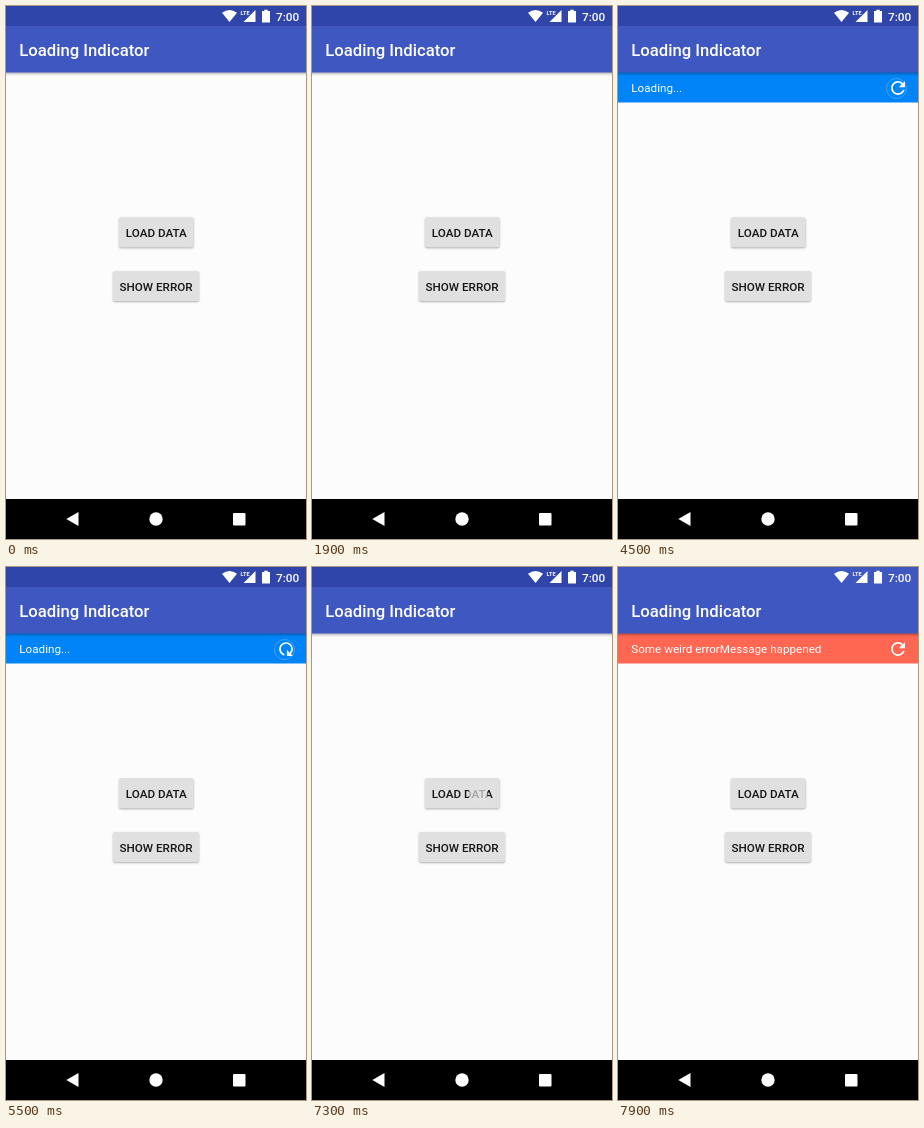
An HTML page with a canvas that plays this animation: 300 px wide and 533 px high, repeating every 8000 ms.

```html
<!DOCTYPE html>
<html lang="en">
<head>
<meta charset="utf-8">
<title>Loading Indicator</title>
<style>
  html, body { margin: 0; width: 100%; height: 100%; overflow: hidden; background: #fcfcfc; }
  canvas { display: block; width: 300px; height: 533px; }
</style>
</head>
<body>
<canvas id="stage"></canvas>
<script>
const W = 300, H = 533, LOOP = 8000, STEP = 100, SPIN = 800;
const PRIMARY = '#3e57c1', DARK = '#2f45a9', BLUE = '#0084f7', RED = '#ff6752';
const canvas = document.getElementById('stage');
const ctx = canvas.getContext('2d');
const dpr = window.devicePixelRatio || 1;
canvas.width = W * dpr;
canvas.height = H * dpr;
ctx.scale(dpr, dpr);

const refresh = new Path2D('M17.65 6.35C16.2 4.9 14.21 4 12 4c-4.42 0-7.99 3.58-7.99 8s3.57 8 7.99 8' +
  'c3.73 0 6.84-2.55 7.73-6h-2.08c-.82 2.33-3.04 4-5.65 4-3.31 0-6-2.69-6-6s2.69-6 6-6' +
  'c1.66 0 3.14.69 4.22 1.78L13 11h7V4z');

// Periods during which the message bar is on screen; zero means no slide out.
const shows = [
  { from: 300, to: 1900, leave: true },
  { from: 2900, to: 6200, leave: true },
  { from: 7300, to: LOOP, leave: false }
];
const errors = [[2900, 4500], [7700, LOOP]];
const touches = [
  [300, 500, 166, 227],
  [2900, 3100, 150, 281],
  [4300, 4500, 278, 82.5],
  [7300, 7500, 166, 227],
  [7600, 7700, 150, 281]
];

const within = (t, a, b) => t >= a && t < b;
const clamp = v => Math.max(0, Math.min(1, v));
const easeOut = v => 1 - (1 - v) ** 2;

function rect(x, y, w, h, color) {
  ctx.fillStyle = color;
  ctx.fillRect(x, y, w, h);
}

function poly(points, color) {
  ctx.fillStyle = color;
  ctx.beginPath();
  points.forEach(([x, y]) => ctx.lineTo(x, y));
  ctx.fill();
}

function disc(x, y, r, color) {
  ctx.fillStyle = color;
  ctx.beginPath();
  ctx.arc(x, y, r, 0, Math.PI * 2);
  ctx.fill();
}

function text(str, x, y, size, weight, color, align = 'left') {
  ctx.font = `${weight} ${size}px Roboto, sans-serif`;
  ctx.textAlign = align;
  ctx.fillStyle = color;
  ctx.fillText(str, x, y);
}

function statusBar(color) {
  rect(0, 0, W, 20, color);
  ctx.fillStyle = '#fff';
  ctx.beginPath();
  ctx.moveTo(223.5, 16);
  ctx.lineTo(216, 6.8);
  ctx.quadraticCurveTo(223.5, 1.2, 231, 6.8);
  ctx.fill();
  poly([[237.5, 16], [249.5, 16], [249.5, 4]], '#fff');
  rect(234, 3, 9.5, 7, color);
  text('LTE', 234.5, 9, 5.6, 700, '#fff');
  rect(256, 5, 8, 11.5, '#fff');
  rect(258.3, 3.7, 3.4, 1.5, '#fff');
  text('7:00', 270, 14.5, 11.8, 500, '#fff');
}

function toolbar() {
  const shade = ctx.createLinearGradient(0, 66, 0, 70);
  shade.addColorStop(0, 'rgba(0,0,0,.28)');
  shade.addColorStop(1, 'rgba(0,0,0,0)');
  rect(0, 66, W, 4, shade);
  rect(0, 20, W, 46.5, PRIMARY);
  text('Loading Indicator', 13.3, 50, 16.67, 500, '#fff');
}

function button(label, x, y, w) {
  ctx.save();
  ctx.shadowColor = 'rgba(0,0,0,.3)';
  ctx.shadowBlur = 2 * dpr;
  ctx.shadowOffsetY = dpr;
  ctx.fillStyle = '#e0e0e0';
  ctx.beginPath();
  ctx.roundRect(x, y, w, 30, 1.7);
  ctx.fill();
  ctx.restore();
  text(label, x + w / 2, y + 19.6, 11.67, 500, '#151515', 'center');
}

function navBar() {
  rect(0, 493, W, 40, '#000');
  poly([[60.3, 513], [72.5, 506], [72.5, 520]], '#fff');
  disc(150, 513, 6.7, '#fff');
  ctx.beginPath();
  ctx.roundRect(227, 507, 12.5, 12.5, 1);
  ctx.fill();
}

function messageBar(t, error) {
  const show = shows.find(s => within(t, s.from, s.to));
  if (!show) return;
  const enter = easeOut(clamp((t - show.from) / 300));
  const exit = show.leave ? clamp((t - show.to + 250) / 250) ** 2 : 0;
  const dy = -31 * (1 - enter + exit);

  ctx.save();
  ctx.beginPath();
  ctx.rect(0, 66, W, 31);
  ctx.clip();
  ctx.translate(0, dy);
  rect(0, 66, W, 30.5, error ? RED : BLUE);
  text(error ? 'Some weird errorMessage happened' : 'Loading...', 13.3, 86.3, 11.67, 400, '#fff');

  ctx.translate(280, 82);
  if (!error && within(t, 4500, 6200)) {
    ctx.strokeStyle = 'rgba(255,255,255,.3)';
    ctx.lineWidth = 0.8;
    ctx.beginPath();
    ctx.arc(-1.5, 0.5, 10, 0, Math.PI * 2);
    ctx.stroke();
  }
  if (!error) {
    const start = t < 2900 ? 200 : t < 7000 ? 4500 : 7300;
    ctx.rotate((t - start) / SPIN * Math.PI * 2);
  }
  ctx.scale(0.86, 0.86);
  ctx.translate(-12, -12);
  ctx.fillStyle = '#fff';
  ctx.fill(refresh);
  ctx.restore();
}

function draw(t) {
  const error = errors.some(([a, b]) => within(t, a, b));
  rect(0, 0, W, H, '#fcfcfc');
  messageBar(t, error);
  toolbar();
  statusBar(error ? PRIMARY : DARK);
  button('LOAD DATA', 113, 211.3, 74.5);
  button('SHOW ERROR', 107, 265, 86);
  navBar();
  for (const [a, b, x, y] of touches) {
    if (within(t, a, b)) disc(x, y, 9.5, y < 100 ? 'rgba(255,255,255,.3)' : 'rgba(226,226,226,.7)');
  }
}

const begin = performance.now();
function tick() {
  const t = (performance.now() - begin) % LOOP;
  draw(Math.floor(t / STEP) * STEP);
  requestAnimationFrame(tick);
}
tick();
</script>
</body>
</html>
```
